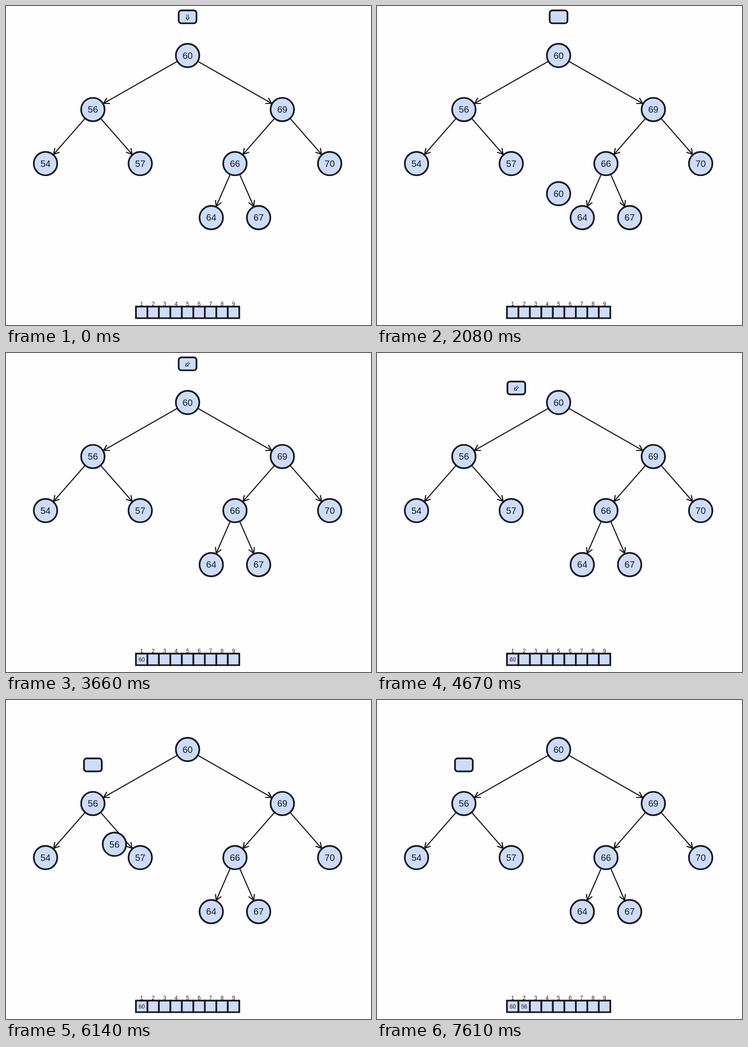
An HTML page with a canvas for the animation above (8 s loop, 800x700 px).

```html
<!DOCTYPE html>
<html lang="en">
<head>
<meta charset="utf-8">
<title>Tree traversal</title>
<style>
  html, body { margin: 0; width: 100%; height: 100%; overflow: hidden; background: #fefefe; }
  canvas { display: block; }
</style>
</head>
<body>
<canvas id="stage" width="800" height="700"></canvas>
<script>
const ctx = document.getElementById('stage').getContext('2d');
const LOOP = 8000, BEAT = 135;
const PAPER = '#fefefe', INK = '#181818', FILL = '#ccdcff';
const ROOT = { x: 398, y: 108.6 }, ROW = 118.6, SPREAD = 207.6;
const REST = { x: ROOT.x, y: 620 };
const RADIUS = 25.7, EDGE_GAP = 27, BARB = 14;
const CELL = 25.17, ARRAY_X = 284.8, ARRAY_Y = 659.6;

const tree = [60, [56, [54], [57]], [69, [66, [64], [67]], [70]]];
const nodes = [], edges = [];

function place([value, ...children], x, y, spread) {
  const node = { value, x, y };
  nodes.push(node);
  children.forEach((child, i) => {
    const side = i ? 1 : -1;
    edges.push([node, place(child, x + side * spread, y + ROW, spread / 2)]);
  });
  return node;
}
place(tree, ROOT.x, ROOT.y, SPREAD);

// Each move is linear from launch to arrive, but only redrawn once per beat from "first".
const visits = [
  { node: nodes[0], shown: 550, stored: 3050, move: { first: 1238, launch: 1106, arrive: 2695 } },
  { node: nodes[1], shown: 5210, stored: 7610, move: { first: 5840, launch: 5789, arrive: 7200 } }
];
const boxMove = { first: 4396, launch: 4288, arrive: 5135 };

function progress({ first, launch, arrive }, t) {
  if (t < first) return 0;
  const beatTime = first + Math.floor((t - first) / BEAT) * BEAT;
  return Math.min(1, (beatTime - launch) / (arrive - launch));
}

const between = (a, b, p) => ({ x: a.x + (b.x - a.x) * p, y: a.y + (b.y - a.y) * p });

function label(text, x, baseline, size) {
  ctx.font = `${size}px "Liberation Sans", Arial, sans-serif`;
  ctx.fillStyle = INK;
  ctx.fillText(text, x, baseline);
}

function paint() {
  ctx.fillStyle = FILL;
  ctx.fill();
  ctx.lineWidth = 3.7;
  ctx.stroke();
}

function drawNode(value, { x, y }) {
  ctx.beginPath();
  ctx.arc(x, y, RADIUS, 0, Math.PI * 2);
  paint();
  label(value, x, y + 7, 20);
}

function drawEdge([from, to]) {
  const length = Math.hypot(to.x - from.x, to.y - from.y) - EDGE_GAP;
  const back = BARB * Math.cos(Math.PI / 6), side = BARB / 2;
  ctx.save();
  ctx.translate(from.x, from.y);
  ctx.rotate(Math.atan2(to.y - from.y, to.x - from.x));
  ctx.lineWidth = 2.4;
  ctx.beginPath();
  ctx.moveTo(EDGE_GAP - 1, 0);
  ctx.lineTo(length, 0);
  ctx.moveTo(length - back, -side);
  ctx.lineTo(length, 0);
  ctx.lineTo(length - back, side);
  ctx.stroke();
  ctx.restore();
}

function drawBox(t) {
  const { x, y } = between(nodes[0], nodes[1], progress(boxMove, t));
  const pointsDown = t < 400, pointsLeft = t >= 3660 && t < 5210;
  ctx.save();
  ctx.translate(x, y - 84.8);
  ctx.beginPath();
  ctx.roundRect(-19.5, -14.2, 39, 28.4, 6);
  paint();
  if (pointsDown || pointsLeft) {
    ctx.translate(0, 0.8);
    if (pointsLeft) ctx.rotate(Math.PI / 4);
    ctx.lineWidth = 1.15;
    ctx.stroke(new Path2D('M-1.7 -6V3.8M1.7 -6V3.8M-4.2 1.2L0 6L4.2 1.2'));
  }
  ctx.restore();
}

function drawArray(t) {
  for (let i = 0; i < 9; i++) {
    const x = ARRAY_X + i * CELL, middle = x + CELL / 2;
    ctx.beginPath();
    ctx.rect(x, ARRAY_Y, CELL, 25.4);
    paint();
    label(i + 1, middle, 658.4, 12);
    const visit = visits[i];
    if (visit && t >= visit.stored) label(visit.node.value, middle, 676.8, 12);
  }
}

function draw(t) {
  ctx.fillStyle = PAPER;
  ctx.fillRect(0, 0, 800, 700);
  ctx.strokeStyle = INK;
  ctx.textAlign = 'center';
  edges.forEach(drawEdge);
  nodes.forEach(node => drawNode(node.value, node));
  drawBox(t);
  for (const { node, shown, stored, move } of visits) {
    if (t >= shown && t < stored) drawNode(node.value, between(node, REST, progress(move, t)));
  }
  drawArray(t);
}

const start = performance.now();
function tick() {
  draw((performance.now() - start) % LOOP);
  requestAnimationFrame(tick);
}
tick();
</script>
</body>
</html>
```
